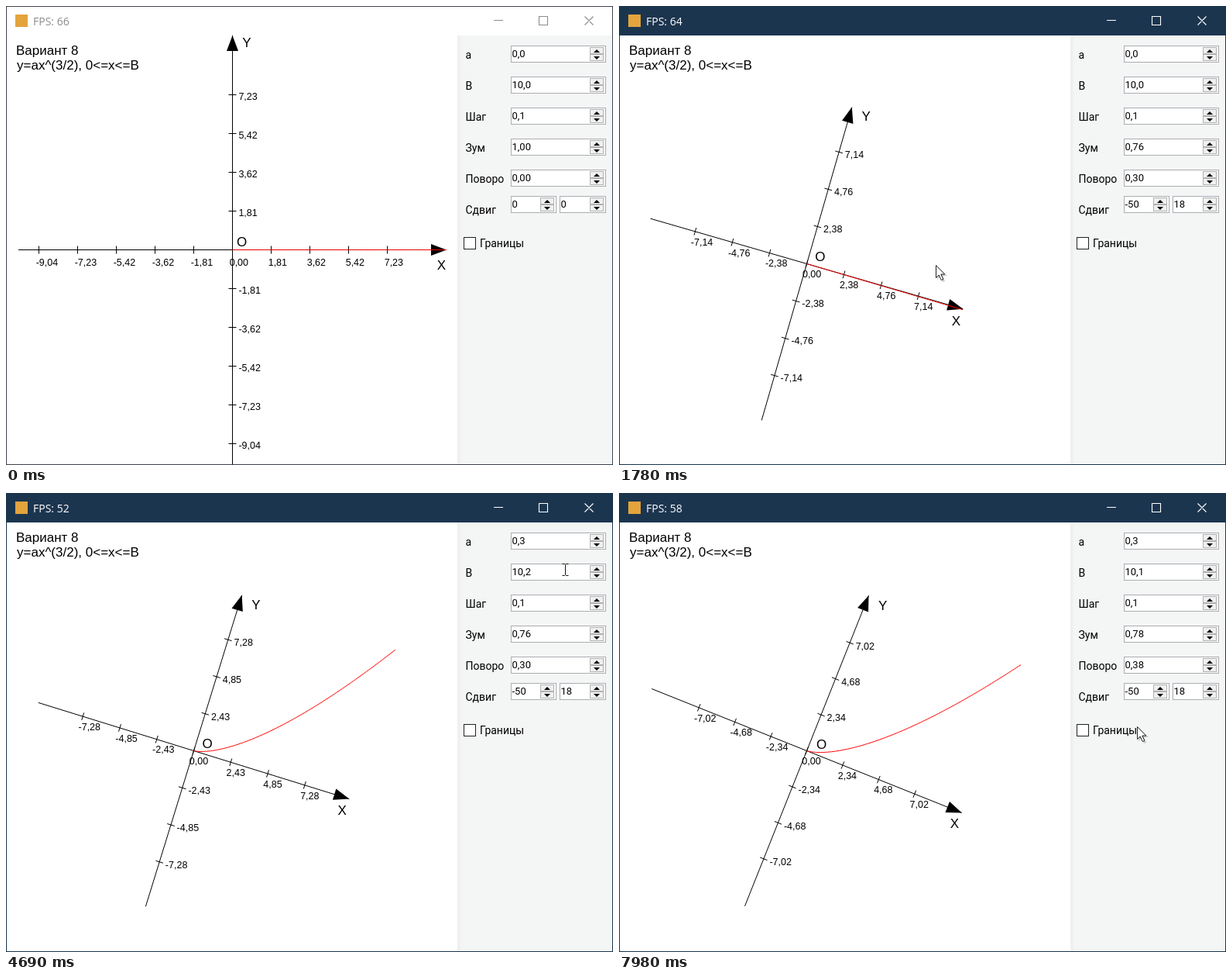
An HTML page for the animation above (8000 ms loop, 784 by 592 pixels).

```html
<!DOCTYPE html>
<html lang="ru">
<head>
<meta charset="utf-8">
<title>Plot</title>
<style>
html, body { margin: 0; width: 100%; height: 100%; overflow: hidden; background: #fff; }
svg { display: block; }
text { white-space: pre; }
.plot { font-family: "Liberation Sans", Arial, sans-serif; }
.ui { font-family: Roboto, sans-serif; }
</style>
</head>
<body>
<svg width="784" height="592" viewBox="0 0 784 592">
  <defs><clipPath id="view"><rect x="1" y="38" width="582" height="553"/></clipPath></defs>
  <rect width="784" height="592" fill="#fff"/>
  <rect x="583" y="38" width="4" height="554" fill="#f0f0f0"/>
  <rect x="587" y="38" width="197" height="554" fill="#f4f5f5"/>
  <rect id="bar" width="784" height="38"/>
  <rect x="12" y="11" width="16" height="16" fill="#e3a43c"/>
  <text id="fps" x="35" y="24.5" font-family="'Open Sans', sans-serif" font-size="14"></text>
  <path id="buttons" d="M630 18.5h12M688.5 13.5h11v11h-11zM747.5 13.5l11 11m0-11l-11 11" fill="none" stroke-width="1.1"/>
  <g class="plot" clip-path="url(#view)">
    <g id="plot"></g>
    <g font-size="17"><text x="13" y="63">Вариант 8</text><text x="14" y="82">y=ax^(3/2), 0&lt;=x&lt;=B</text></g>
  </g>
  <g id="panel" class="ui"></g>
  <rect id="edge" x=".5" y=".5" width="783" height="591" fill="none"/>
  <g id="arrow">
    <path d="M2 2v17l4-4 3 7 3-1-3-7h6z" opacity=".2"/>
    <path d="M.5.5v16l3.7-3.5 3 6.5 2.6-1.2-3-6.3h5z" fill="#fff" stroke="#222"/>
  </g>
  <path id="beam" d="M-4-7.5h3l1 1 1-1h3M0-6.5v13M-4 7.5h3l1-1 1 1h3" fill="none" stroke="#111"/>
</svg>
<script>
const LOOP = 8000, HALF = 276.5, STEP = 50, LEAD = 35;
const $ = id => document.getElementById(id);
const num = (v, d) => v.toFixed(d).replace('.', ',');
const clamp = (v, lo, hi) => Math.min(hi, Math.max(lo, v));

// Eased moves, each [from, to, ...goal]
const glide = (t, home, moves) => home.map((v0, c) => moves.reduce((v, m) => {
  const p = clamp((t - m[0]) / (m[1] - m[0]), 0, 1);
  return p === 1 ? m[c + 2] : v + (m[c + 2] - v) * p * p * (3 - 2 * p);
}, v0));

// Runs of wheel clicks, each [first, gap, count, delta]
const clicks = (t, base, runs) => runs.reduce((v, [first, gap, count, delta]) =>
  v + delta * clamp(Math.floor((t - first) / gap) + 1, 0, count), base);

const rates = [66, 59, 64, 57, 52, 52, 55, 57, 58];

const coefAt = t => clicks(t, 0, [[2520, 75, 5, 1], [3200, 90, 3, -1], [3660, 1, 1, 1]]) / 10;
const limitAt = t => clicks(t, 100, [[4300, 30, 3, 1], [4680, 120, 2, -1]]) / 10;
const zoomAt = t => clicks(t, 100, [[280, 45, 12, -2], [6980, 90, 2, -1], [7510, 30, 4, 1]]) / 100;
const turnAt = t => glide(t, [0], [[1560, 1775, .281], [1775, 1900, .3], [5740, 5930, .34], [6160, 6260, .38]])[0];
const shiftAt = t => glide(t, [0, 0], [[900, 1240, -62.95, 37.2], [1240, 1430, -50, 18]]);
const mouseAt = t => glide(t, [560, 480], [
  [70, 250, 434, 289], [900, 1240, 371, 326], [1240, 1430, 384, 307], [1480, 1690, 409, 334],
  [1900, 2320, 741, 59.5], [3720, 4170, 722, 99.5], [4860, 5470, 712, 220.5],
  [6480, 6880, 723, 185], [7790, 7975, 669, 301]]);

const fields = [0, 1, 2, 3, 4].map(i => [652, 51 + 40 * i, 122]).concat([[652, 245, 58], [715, 245, 59]]);

function buildPanel() {
  let s = ['a', 'B', 'Шаг', 'Зум', 'Поворо', 'Сдвиг'].map((w, i) =>
    `<text x="593.5" y="${68 + 40 * i}" font-size="14">${w}</text>`).join('');
  fields.forEach(([x, y, w]) => {
    const r = x + w - 19.5;
    const button = dy => `<rect x="${r}" y="${y + dy}" width="17" height="8" fill="#f0f0f0" stroke="#b2b2b2"/>`;
    s += `<rect x="${x + .5}" y="${y + .5}" width="${w}" height="21" fill="#fff" stroke="#abadb3"/>
      ${button(2.5)}${button(11.5)}
      <path d="M${r + 4.5} ${y + 9}l4-4 4 4zM${r + 4.5} ${y + 14}l4 4 4-4z"/>
      <text class="value" x="${x + 1.5}" y="${y + 15}" font-size="13"></text>`;
  });
  $('panel').innerHTML = s + `<rect x="591.5" y="298.5" width="15" height="15" fill="#fff" stroke="#222"/>
    <text x="612" y="311" font-size="14">Границы</text>`;
}

// Helpers for plot coordinates at time t
function frameAt(t) {
  const [sx, sy] = shiftAt(t), turn = turnAt(t);
  const cos = Math.cos(turn), sin = Math.sin(turn);
  const rot = (x, y) => [x * cos - y * sin, x * sin + y * cos];
  const at = (x, y) => { const [u, v] = rot(x, y); return [292.5 + sx + u, 314.5 + sy + v]; };
  const line = (...pts) => 'M' + pts.map(p => at(...p).map(v => v.toFixed(2)).join(' ')).join('L');
  return { rot, at, line };
}

function drawPlot(t, a, b, zoom) {
  const { rot, at, line } = frameAt(t);
  const len = HALF * zoom, unit = len / Math.max(b, a * b ** 1.5);
  let axes = line([-len, 0], [len, 0]) + line([0, -len], [0, len]);
  let text = '';
  // Offset (u, v) turns with the axes, (dx, dy) does not
  const label = (x, y, u, v, dx, dy, str, big) => {
    const [px, py] = at(x, y), [qx, qy] = rot(u, v);
    const style = big ? 'font-size="17" text-anchor="middle"' : 'font-size="12.5"';
    text += `<text ${style} x="${px + qx + dx}" y="${py + qy + dy + (big ? 6.1 : 4.5)}">${str}</text>`;
  };
  for (let n = -Math.floor((len - 20) / STEP); n <= (len - 40) / STEP; n++) {
    const d = n * STEP, str = num(d / unit, 2);
    axes += line([d, -5], [d, 5]);
    label(d, 0, 0, 8.3 * zoom, -3.8, 7.2, str);
    if (n) {
      axes += line([-5, -d], [5, -d]);
      label(0, -d, 5, 0, 2.9, 2, str);
    }
  }
  label(0, 0, 1.6, -18.9, 10.6, 8.1, 'O', true);
  label(len, 0, -15.6, 10.8, 9.1, 8.7, 'X', true);
  label(0, -len, 9.9, -1.5, 8.4, 10.2, 'Y', true);

  const heads = line([len, 0], [len - 20, -7.5], [len - 20, 7.5]) + line([0, -len], [-7.5, 20 - len], [7.5, 20 - len]);
  const points = Array.from({ length: 101 }, (_, i) => {
    const x = b * i / 100;
    return [x * unit, -a * x ** 1.5 * unit];
  });
  // The curve is repainted slightly ahead of the axes
  const curve = frameAt(t + LEAD).line(...points);
  $('plot').innerHTML = `<path d="${axes}" fill="none" stroke="#000"/><path d="${heads}"/>
    <path d="${curve}" fill="none" stroke="#f00"/>${text}`;
}

function drawMouse(t) {
  const [x, y] = mouseAt(t);
  const inside = fields.some(f => x > f[0] && x < f[0] + f[2] - 20 && y > f[1] && y < f[1] + 22);
  const show = (id, on, px, py) => {
    $(id).setAttribute('visibility', on && t >= 70 ? 'visible' : 'hidden');
    $(id).setAttribute('transform', `translate(${px} ${py})`);
  };
  show('arrow', !inside, Math.round(x), Math.round(y));
  show('beam', inside, Math.floor(x) + .5, Math.floor(y));
}

function draw(t) {
  const active = t >= 100, ink = active ? '#fff' : '#8c8c8c';
  $('bar').setAttribute('fill', active ? '#1c354f' : '#fff');
  $('edge').setAttribute('stroke', active ? '#1c354f' : '#3d444c');
  $('fps').setAttribute('fill', ink);
  $('buttons').setAttribute('stroke', ink);
  $('fps').textContent = 'FPS: ' + rates[Math.floor((t + 490) / 1005)];

  const a = coefAt(t), b = limitAt(t), zoom = zoomAt(t);
  const turn = Math.ceil(turnAt(t) * 50 - .05) / 50;
  const shown = [num(a, 1), num(b, 1), '0,1', num(zoom, 2), num(Math.abs(turn), 2), ...shiftAt(t).map(Math.trunc)];
  document.querySelectorAll('.value').forEach((el, i) => { el.textContent = shown[i]; });
  drawPlot(t, a, b, zoom);
  drawMouse(t);
}

buildPanel();
const start = performance.now();
function frame() {
  draw((performance.now() - start) % LOOP);
  requestAnimationFrame(frame);
}
frame();
</script>
</body>
</html>
```
